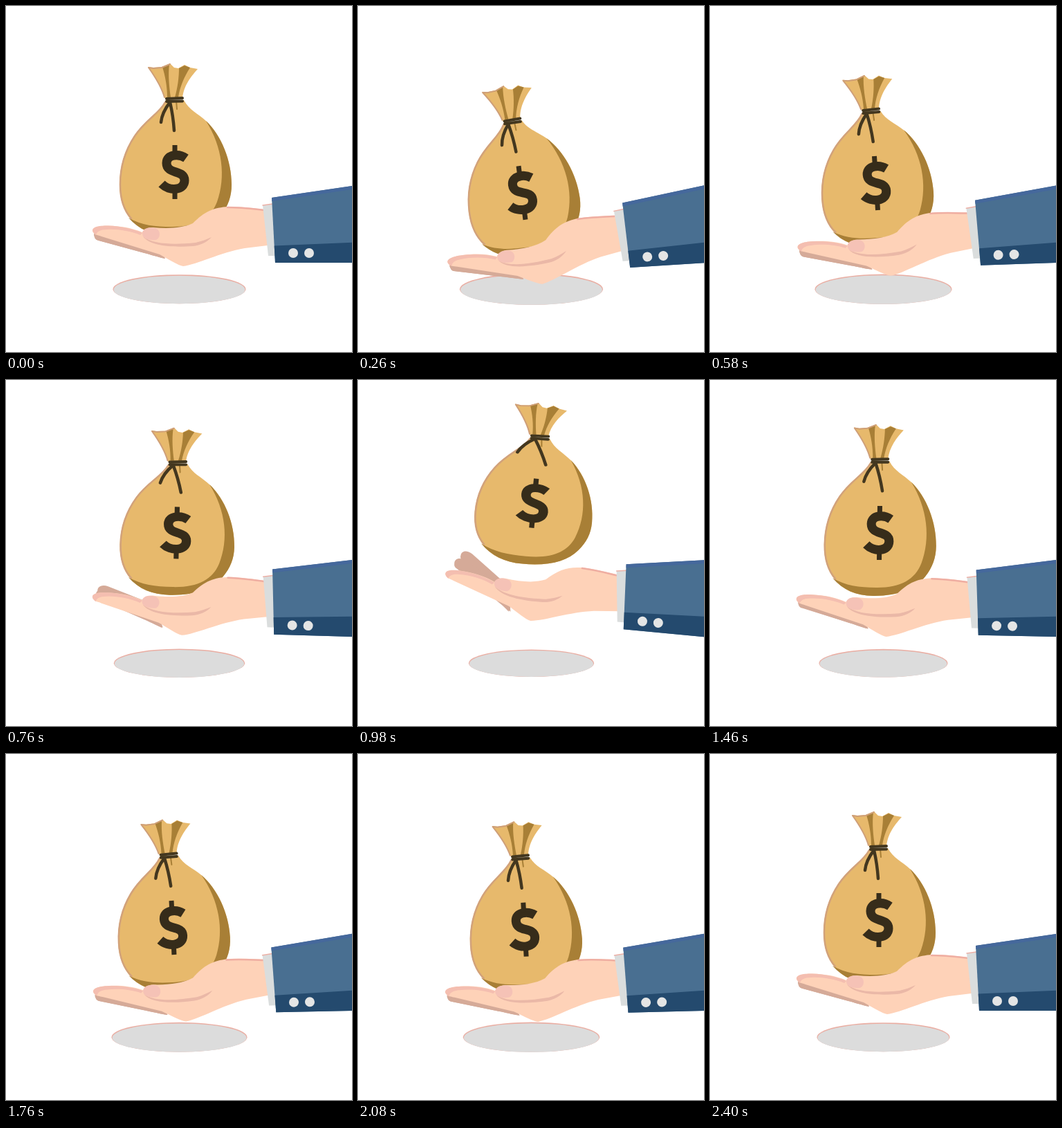
Animation of 500x500 px, one loop 2.9 s. Source, as an HTML page:

```html
<!DOCTYPE html>
<html lang="en">
<head>
<meta charset="utf-8">
<title>Money bag on a hand</title>
<style>
  html, body { margin: 0; width: 100%; height: 100%; overflow: hidden; background: #fff; }
  svg { display: block; width: 100vw; height: 100vh; }
  .line { fill: none; stroke-linecap: round; }
</style>
</head>
<body>
<svg viewBox="0 0 500 500">
  <defs>
    <path id="finger" fill="#d5aa98" d="M128 334C125 327 131 322 141 323L215 335L230 365C220 363 208 359 200 357L134 339Q129 338 128 334Z"/>
  </defs>

  <g id="shadow">
    <ellipse rx="96" ry="21" fill="#eaaea3"/>
    <ellipse cy=".8" rx="95" ry="20.2" fill="#dcdcdc"/>
  </g>

  <g class="arm"><g class="hand">
    <use id="fingerA" href="#finger"/>
    <use id="fingerB" href="#finger"/>
  </g></g>

  <!-- Bag coordinates are relative to the centre of the dollar sign -->
  <g id="bag">
    <path fill="#e7b96c" d="M-39-152L-31-151L-19-152L-7-157L-1-151L5-150L14-155L22-151L33-149C24-139 12-124 11-106L-14-106C-18-122 -28-137 -39-152Z"/>
    <path fill="#a87f36" d="M-18-152L-8-156C-10-140 -8-122 -6-108L-11-108C-11-124 -14-139 -18-152ZM6-150L14-154L22-151C13-137 7-122 5-108L0-108C4-122 6-137 6-150Z"/>
    <path class="line" stroke="#cf9f78" stroke-width="2" d="M-38-151L-31-150L-19-151L-7-156M-38-151C-28-137 -19-122 -15-108"/>
    <path id="body" fill="#e7b96c" d="M-13-104C-23-84 -43-76 -59-52C-73-31 -80-7 -80 18C-80 39 -74 56 -64 68C-52 83 -33 91 -8 91C27 91 53 81 67 62C77 49 82 35 82 18C82-17 67-53 46-73C32-86 21-89 13-104Z"/>
    <path fill="#a87f36" d="M45-74C67-53 82-17 82 18C82 35 77 49 67 62C53 81 27 91 -8 91C-33 91 -52 83 -67 66C-48 77 -29 79 -4 79C31 79 52 67 61 43C74 7 69-36 45-74Z"/>
    <path class="line" stroke="#d2a27b" stroke-width="2.5" d="M-14-101C-23-84 -42-76 -58-52C-72-31 -79-7 -79 18C-79 39 -73 56 -63 67"/>
    <path class="line" stroke="#a87f36" stroke-width="2" d="M2-103L3-91"/>
    <g class="line" stroke="#43371f">
      <path stroke-width="4" d="M-12-106L11-107M-12-102L11-102.500"/>
      <path id="tieLeft" stroke-width="4.500" d="M-7-101C-14-92 -19-82 -20-72"/>
      <path id="tieRight" stroke-width="4.500" d="M-7-101C-4-88 -2-75 -1-60"/>
    </g>
    <g id="dollar">
      <path fill="none" stroke="#362c1a" stroke-width="13" d="M16-20C6-27 -12-26 -12-13C-12 4 14-4 14 12C14 27 -8 28 -19 17"/>
      <path fill="#362c1a" d="M-3.500-39h7v14h-7zM-3.500 25h7v14h-7z"/>
    </g>
  </g>

  <g class="arm">
    <g class="hand">
      <path fill="#fed2b8" d="M386 295C355 292 340 290 322 290C300 291 287 297 270 314C255 321 235 322 212 320C204 320 199 323 197 327C180 320 165 318 148 317.500C132 317 122 321 126 327C128 331 133 331 138 333L222 359C235 366 249 375 256 376C275 374 310 356 345 350L386 345Z"/>
      <path fill="#f4beb0" d="M126 327C122 320 132 317 148 317.500C165 318 185 322 197 328L194 331C180 325 160 322 146 323C136 323 131 326 130 331Z"/>
      <path class="line" stroke="#efaea2" stroke-width="2.500" d="M320 291C340 291 355 293 373 295"/>
      <path fill="#eab8a7" d="M198 333C213 345 244 345 274 342C283 340 290 337 297 334C291 341 281 346 270 347C240 349 208 347 198 333Z"/>
      <path fill="#f5c2b6" d="M197 329C197 321 207 319 215 321C224 323 224 335 217 338C207 339 197 336 197 329Z"/>
    </g>
    <path fill="#dadddd" d="M371 288L386 286L391 361L379 361Z"/>
    <path class="line" stroke="#ecb0a6" stroke-width="1.500" d="M371 288L385 286"/>
    <path fill="#496f91" d="M384 277L540 254V371H389Z"/>
    <path fill="#45689c" d="M384 277L540 254V259L384.300 282Z"/>
    <path fill="#244a6e" d="M387.700 346.500L540 340V371H389Z"/>
    <g fill="#e4e5e5"><circle cx="415" cy="357" r="7"/><circle cx="438" cy="357" r="7"/></g>
  </g>
</svg>
<script>
const LOOP = 2900, MOVE = 2400, STEP = 20;
const times = [0, 260, 330, 580, 980, 1070, 1460, 1760, 1930, 2400];
const tracks = {
  arm:    [0, -3.7, -3.9, -1.9, 5.4, 5.5, 1.2, -1.2, -1.8, 0],
  hand:   [0, -4.9, -5.2, -2.7, 2.1, 2.1, 0, -2.5, -3.2, 0],
  spread: [0, 0, 0, 0, 1, 1, .06, 0, 0, 0],
  x:      [244, 237, 236.500, 240, 254, 254.500, 245, 241, 240, 244],
  y:      [240, 270, 272, 256, 181, 177, 221, 251, 258, 240],
  tilt:   [0, -7.3, -7.7, -3.7, 5.5, 5.4, .7, -2.9, -4.2, 0],
  squash: [0, 0, 0, 0, 1, .9, 0, 0, 0, 0],
  swing:  [0, 0, 0, .05, 1, 1, .35, .1, 0, 0],
  shadow: [96, 103.5, 104, 99, 90.5, 90, 93, 98, 99.5, 96]
};

// Monotone cubic: flat at turning points, smooth elsewhere.
function sample(v, t) {
  const rate = i => (v[i + 1] - v[i]) / (times[i + 1] - times[i]);
  const slope = i => {
    if (i === 0 || i === times.length - 1) return 0;
    const a = rate(i - 1), b = rate(i);
    return a * b > 0 ? 2 * a * b / (a + b) : 0;
  };
  let i = 0;
  while (i < times.length - 2 && t >= times[i + 1]) i++;
  const h = times[i + 1] - times[i], u = (t - times[i]) / h, w = 1 - u;
  return v[i] * w * w * (1 + 2 * u) + v[i + 1] * u * u * (3 - 2 * u)
    + h * u * w * (slope(i) * w - slope(i + 1) * u);
}

function place(selector, transform) {
  for (const el of document.querySelectorAll(selector)) el.setAttribute('transform', transform);
}

function draw(now) {
  const t = Math.min(MOVE, Math.floor(now % LOOP / STEP) * STEP);
  const p = {};
  for (const name in tracks) p[name] = sample(tracks[name], t);

  place('.arm', `rotate(${p.arm} 500 310)`);
  place('.hand', `rotate(${p.hand} 380 320)`);
  place('#fingerA', `rotate(${25 * p.spread} 222 350)`);
  place('#fingerB', `rotate(${16 * p.spread} 222 350)`);
  place('#bag', `translate(${p.x} ${p.y}) rotate(${p.tilt}) scale(${1 + .05 * p.squash} ${1 - .057 * p.squash})`);
  place('#dollar', `translate(0 ${-3 * p.squash}) scale(1 ${1 - .03 * p.squash})`);
  place('#tieLeft', `rotate(${20 * p.swing} -6 -102)`);
  place('#tieRight', `rotate(${-17 * p.swing} -6 -102)`);
  place('#shadow', `translate(250.5 409.2) scale(${p.shadow / 96})`);
  requestAnimationFrame(draw);
}
const start = performance.now();
const first = draw;
first(0);
function draw0() {}
</script>
</body>
</html>
```
